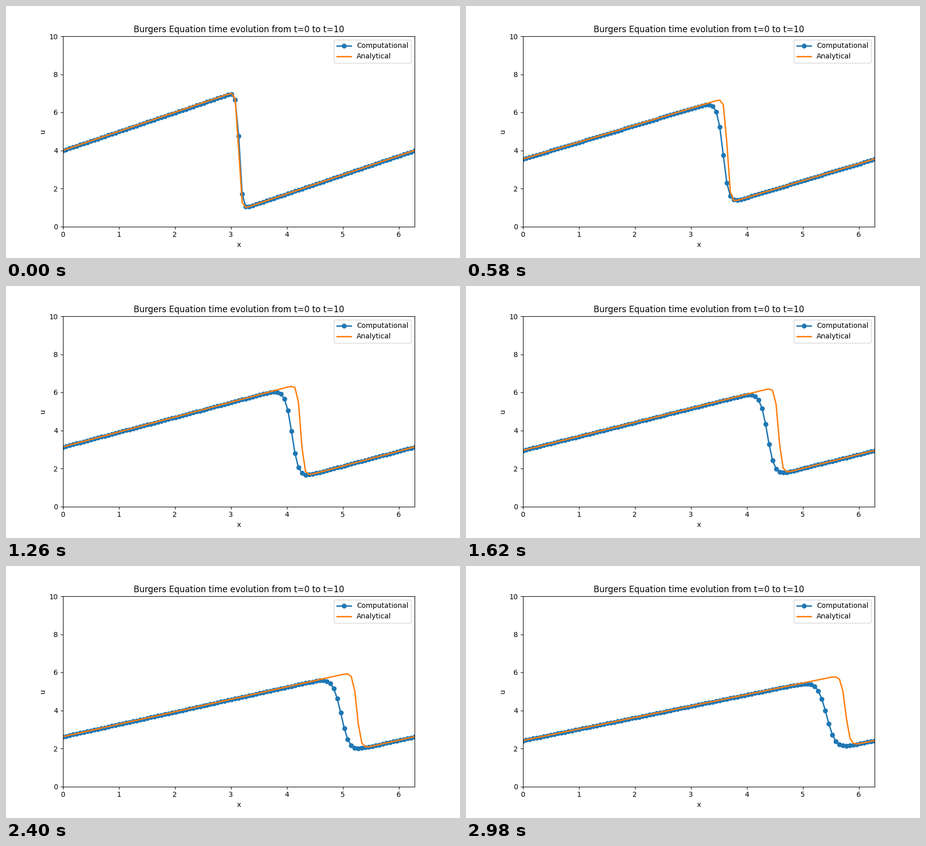
Write a matplotlib script that moves like this. It is 900x500 px and loops after 3 s.

```python
import numpy as np
import matplotlib.pyplot as plt
from matplotlib.animation import FuncAnimation

FRAMES = 150
NX = 101
NU = 0.07
LENGTH = 2 * np.pi
DX = LENGTH / (NX - 1)
DT = DX * NU

x = np.linspace(0, LENGTH, NX)


def analytical(t):
    """Periodic sawtooth solution of the viscous Burgers equation."""
    s = x - 4 * t
    width = 4 * NU * (t + 1)
    left = np.exp(-s**2 / width)
    right = np.exp(-(s - LENGTH)**2 / width)
    phi = left + right
    dphi = -2 / width * (s * left + (s - LENGTH) * right)
    return 4 - 2 * NU * dphi / phi


def step(u):
    """One explicit step: upwind advection, central diffusion."""
    v = u[:-1]
    prev, nxt = np.roll(v, 1), np.roll(v, -1)
    v = (v - v * DT / DX * (v - prev)
         + NU * DT / DX**2 * (nxt - 2 * v + prev))
    return np.append(v, v[0])


history = [step(analytical(0))]
while len(history) < FRAMES:
    history.append(step(history[-1]))

fig, ax = plt.subplots(figsize=(9, 5), dpi=100)
fig.subplots_adjust(left=0.125, right=0.9, bottom=0.125, top=0.88)
ax.set(xlim=(0, LENGTH), ylim=(0, 10), xlabel="x", ylabel="u",
       title="Burgers Equation time evolution from t=0 to t=10")
computed, = ax.plot([], [], color="C0", marker="o", lw=2, label="Computational")
exact, = ax.plot([], [], color="C1", lw=2, label="Analytical")
ax.legend(loc="upper right")


def update(n):
    computed.set_data(x, history[n])
    exact.set_data(x, analytical(n * DT))
    return computed, exact


anim = FuncAnimation(fig, update, frames=FRAMES, interval=20,
                     repeat=True, repeat_delay=0)
plt.show()
```
